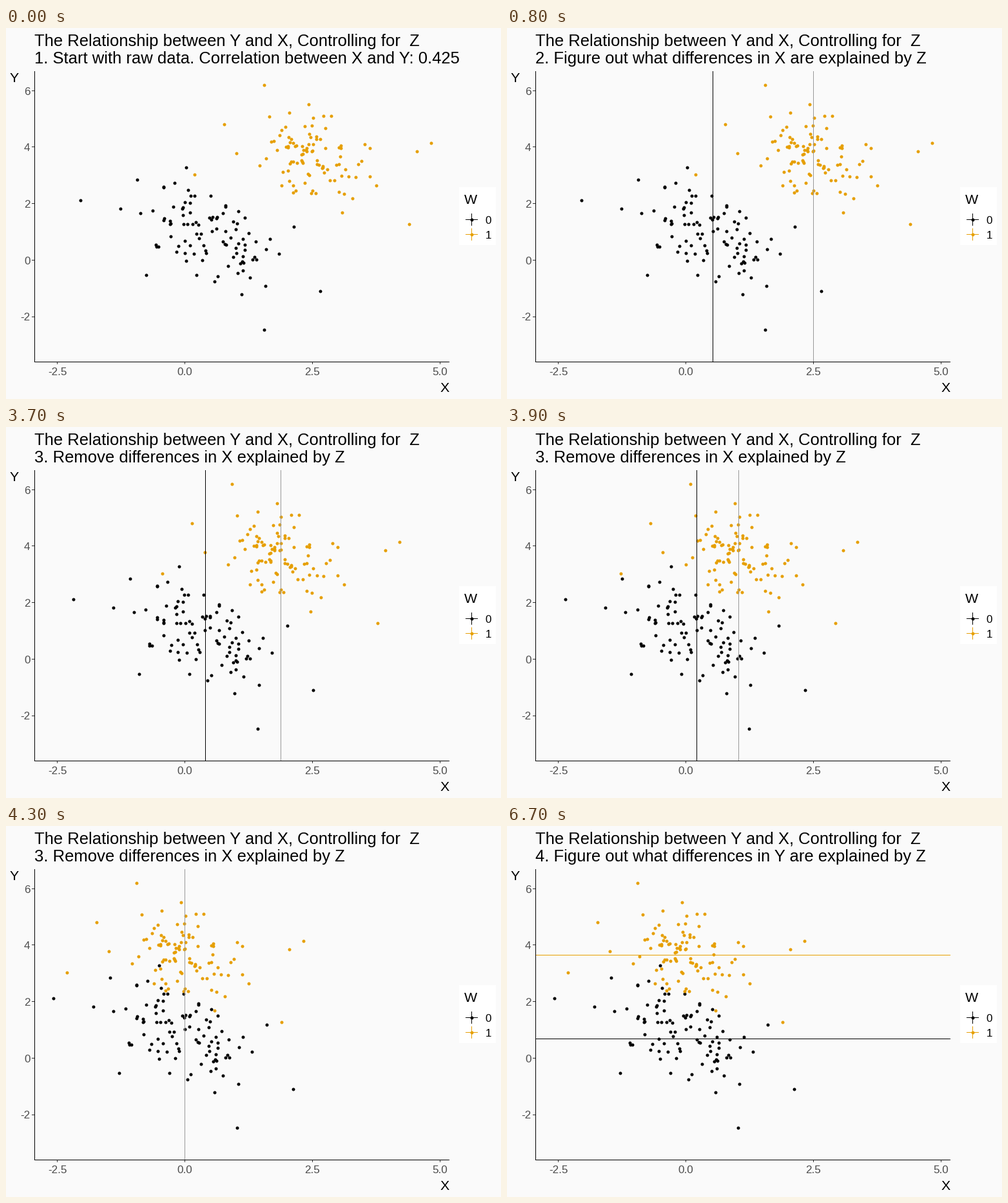
Recreate the animation shown at these times as a matplotlib script. Size 768 by 576 pixels, loop 8000 ms.

```python
import math

import matplotlib.pyplot as plt
import numpy as np
from matplotlib.animation import FuncAnimation
from matplotlib.markers import MarkerStyle
from matplotlib.patches import Rectangle
from matplotlib.transforms import Affine2D

WIDTH, HEIGHT, DPI = 768, 576, 96
FRAMES, INTERVAL = 80, 100
BLACK, ORANGE, GREY = "#000000", "#E69F00", "#999999"
LEFT, RIGHT, TOP, BOTTOM = 44, 688, 67, 518
ZERO_X = 277.5
MEAN_SHIFT = {BLACK: 42, ORANGE: 198}
PIXEL = 72 / DPI
# Markers are placed on pixel corners; move them to pixel centres.
DOT = MarkerStyle("o", transform=Affine2D().translate(0.1, -0.1))

plt.rcParams["font.family"] = "Liberation Sans"


def cloud(seed, count, center, spread, slope, extremes):
    """A tilted normal cloud cut off at two deviations, plus a few extremes."""
    rng = np.random.default_rng(seed)
    radius = np.sqrt(-2 * np.log(1 - rng.random(count) * (1 - math.exp(-2))))
    angle = rng.random(count) * 2 * math.pi
    dx = spread[0] * radius * np.cos(angle)
    dy = spread[1] * radius * np.sin(angle) + slope * dx
    inner = np.column_stack([center[0] + dx, center[1] + dy])
    return np.round(np.vstack([inner, extremes]))


POINTS = {
    BLACK: cloud(4, 92, (318, 328), (60, 37), 0.45, [
        (115, 267), (177, 280), (203, 235), (279, 216),
        (400, 468), (487, 408), (446, 308), (217, 383)]),
    ORANGE: cloud(11, 92, (470, 198), (58, 37), 0.18, [
        (400, 88), (469, 118), (338, 149), (292, 227),
        (521, 286), (659, 178), (637, 191), (625, 304)]),
}

fig = plt.figure(figsize=(WIDTH / DPI, HEIGHT / DPI), dpi=DPI, facecolor="#FAFAFA")
ax = fig.add_axes([0, 0, 1, 1])
ax.set_xlim(0, WIDTH)
ax.set_ylim(HEIGHT, 0)
ax.axis("off")


def line(xs, ys, color, z=3):
    return ax.plot(xs, ys, color=color, lw=PIXEL, solid_capstyle="butt",
                   snap=False, zorder=z)[0]


def hline(y, x0, x1, color, z=3):
    row = math.floor(y) + 0.5
    return line([x0, x1], [row, row], color, z)


def vline(x, y0, y1, color, z=3):
    column = math.floor(x) + 0.5
    return line([column, column], [y0, y1], color, z)


def dots(xs, ys, color):
    return ax.plot(xs, ys, linestyle="none", marker=DOT, color=color,
                   ms=5 * PIXEL, mew=0, antialiased=False, zorder=2)[0]


def label(x, y, text, size, color="black", ha="left"):
    return ax.text(x, y, text, size=size, color=color, ha=ha, va="baseline")


def draw_axes():
    for value in np.arange(-2.5, 5.1, 2.5):
        x = ZERO_X + 79.2 * value
        vline(x, BOTTOM + 1, BOTTOM + 4, "#333333")
        label(x, 539, f"{value:.1f}", 12.8, "#4D4D4D", "center")
    for value in range(-2, 7, 2):
        y = 360.3 - 43.85 * value
        hline(y, LEFT - 4, LEFT, "#333333")
        label(37.5, y + 6.5, str(value), 12.8, "#4D4D4D", "right")
    vline(LEFT, TOP, BOTTOM + 1, BLACK)
    hline(BOTTOM, LEFT, RIGHT, BLACK)
    label(6, 84, "Y", 16)
    label(RIGHT, 565, "X", 16, ha="right")


def draw_legend():
    ax.add_patch(Rectangle((703, 247), 57, 90, fc="white", ec="none"))
    label(710.5, 273, "W", 16)
    for text, color, y in (("0", BLACK, 297), ("1", ORANGE, 320)):
        hline(y, 713, 732, color)
        vline(722, y - 9, y + 10, color)
        dots([722], [y], color)
        label(743.5, y + 7, text, 12.8)


TITLES = [
    (0, "1. Start with raw data. Correlation between X and Y: 0.425"),
    (500, "2. Figure out what differences in X are explained by Z"),
    (3500, "3. Remove differences in X explained by Z"),
    (6400, "4. Figure out what differences in Y are explained by Z"),
]

draw_axes()
draw_legend()
label(44, 28, "The Relationship between Y and X, Controlling for  Z", 19.2)
subtitle = label(44, 55, "", 19.2)
scatter = {color: dots(*points.T, color) for color, points in POINTS.items()}
x_means = {
    BLACK: vline(ZERO_X, TOP, BOTTOM, BLACK, 4),
    ORANGE: vline(ZERO_X, TOP, BOTTOM, GREY, 5),
}
y_means = [hline(330, LEFT + 1, RIGHT, BLACK, 4),
           hline(200, LEFT + 1, RIGHT, ORANGE, 4)]


def update(frame):
    time = frame * INTERVAL
    subtitle.set_text([text for start, text in TITLES if start <= time][-1])
    progress = min(max((time - 3400) / 900, 0), 1)
    eased = (1 - math.cos(math.pi * progress)) / 2
    for color, shift in MEAN_SHIFT.items():
        scatter[color].set_xdata(np.round(POINTS[color][:, 0] - shift * eased))
        column = math.floor(ZERO_X + shift * (1 - eased)) + 0.5
        x_means[color].set_xdata([column, column])
        x_means[color].set_visible(800 <= time < 6400)
    for mean in y_means:
        mean.set_visible(time >= 6700)
    return [subtitle, *scatter.values(), *x_means.values(), *y_means]


animation = FuncAnimation(fig, update, frames=FRAMES, interval=INTERVAL,
                          repeat=True, repeat_delay=0)
plt.show()
```
